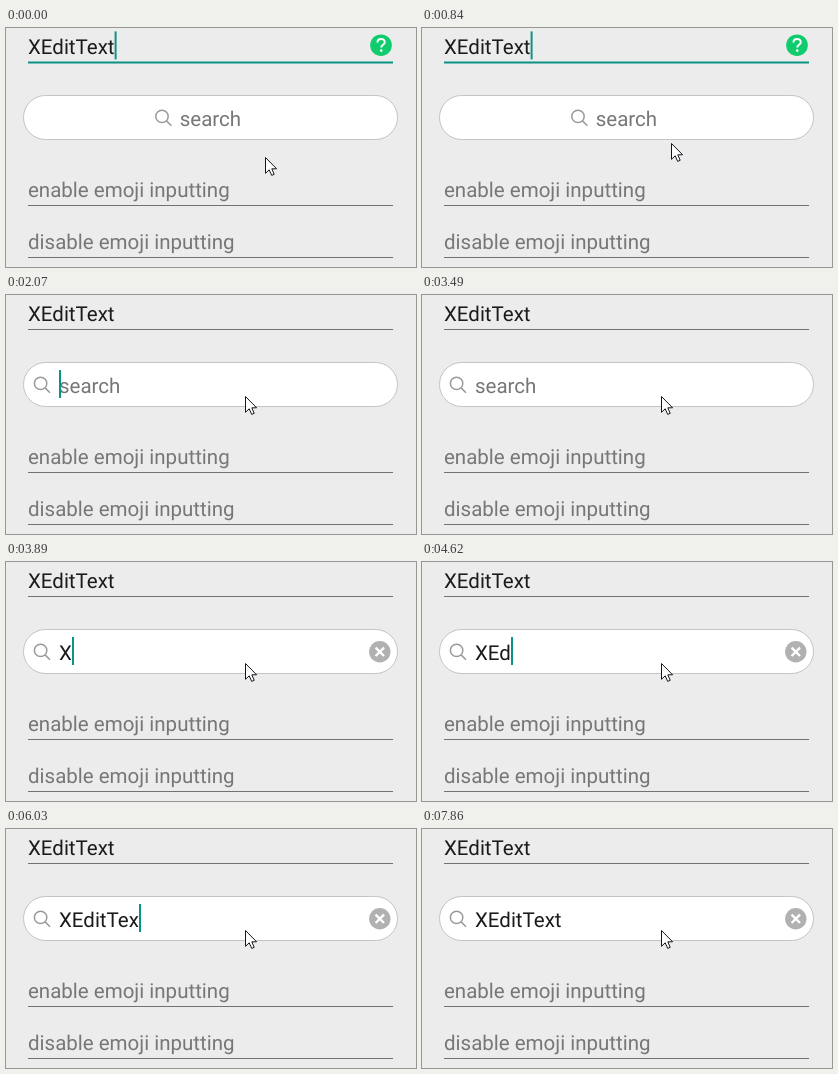
Animation of 410x239 px, one loop 8000 ms. Source, as an HTML page:

```html
<!DOCTYPE html>
<html lang="en">
<head>
<meta charset="utf-8">
<title>Edit text demo</title>
<style>
  html, body { margin: 0; width: 100%; height: 100%; overflow: hidden; background: #ececec; }
  svg { display: block; width: 410px; height: 239px; }
  text { font: 20.5px Roboto, sans-serif; fill: #1b1b1b; text-rendering: geometricPrecision; }
  .hint { fill: #777; }
  .line { fill: #717171; }
  .accent { fill: #0b9384; }
</style>
</head>
<body>
<svg viewBox="0 0 410 239">
  <rect width="410" height="239" fill="#ececec"/>

  <text x="22" y="26">XEditText</text>
  <rect id="idleLine" class="line" x="22" y="34" width="365" height="1"/>
  <g id="focused">
    <rect class="accent" x="22" y="33.5" width="365" height="2"/>
    <circle cx="375" cy="17.2" r="10.8" fill="#10cc6c"/>
    <path d="M371.4 14.6C371.4 9.8 378.8 9.8 378.8 14.2C378.8 16.8 375.2 16.8 375.2 19.6"
      fill="none" stroke="#fff" stroke-width="2"/>
    <circle cx="375.2" cy="22.6" r="1.3" fill="#fff"/>
  </g>

  <rect x="17.5" y="67.5" width="374" height="44" rx="22" fill="#fff" stroke="#c4c4c4"/>
  <g id="lens" fill="none" stroke="#999" stroke-width="1.5">
    <circle cx="34.6" cy="88.4" r="6.2"/>
    <path d="M39.1 92.9L44 97.8"/>
  </g>
  <text id="search" y="98"></text>
  <g id="clear">
    <circle cx="373.8" cy="89.8" r="10.7" fill="#b1b1b1"/>
    <path d="M369.6 85.6l8.4 8.4m0-8.4l-8.4 8.4" stroke="#fff" stroke-width="2.4"/>
  </g>

  <text class="hint" x="22" y="169">enable emoji inputting</text>
  <rect class="line" x="22" y="177" width="365" height="1"/>
  <text class="hint" x="22" y="221">disable emoji inputting</text>
  <rect class="line" x="22" y="229" width="365" height="1"/>

  <rect id="caret" class="accent" width="2" height="28"/>
  <path id="pointer" d="M.5 .5V16.3L4.2 12.8L6.7 18.4L9.2 17.3L6.8 11.8H11.6Z"
    fill="#fff" stroke="#15151f" stroke-linejoin="round"/>
</svg>
<script>
  const LOOP = 8000;
  const FOCUS = 2070;
  const WORD = "XEditText";
  const typeTimes = [3890, 4480, 4620, 4930, 5200, 5630, 5780, 6030, 6310];
  const caretStops = [53, 66, 77, 89, 94, 101, 113, 123, 133, 140];
  // Spans during which the caret is hidden
  const caretOff = [[410, 840], [1390, 1820], [2500, 3060], [3490, 3890],
    [4320, 4480], [6770, 7300], [7860, LOOP]];
  const pointerPath = [[0, 259, 129], [840, 249, 115], [960, 242, 105], [1080, 239, 101]];

  const el = id => document.getElementById(id);
  const show = (id, on) => el(id).setAttribute("visibility", on ? "visible" : "hidden");
  const move = (id, x, y) => el(id).setAttribute("transform", `translate(${x} ${y})`);

  function render(t) {
    const searching = t >= FOCUS;
    const typed = typeTimes.filter(at => t >= at).length;
    const search = el("search");

    show("focused", !searching);
    show("idleLine", searching);
    show("clear", typed > 0);
    move("lens", searching ? 0 : 121.4, 0);

    search.textContent = typed ? WORD.slice(0, typed) : "search";
    search.setAttribute("class", typed ? "" : "hint");
    search.setAttribute("x", searching ? 53 : 173.7);

    show("caret", !caretOff.some(([from, to]) => t >= from && t < to));
    if (searching) move("caret", caretStops[typed], 75);
    else move("caret", 108.6, 3.4);

    const [, x, y] = pointerPath.filter(([at]) => t >= at).pop();
    move("pointer", x, y);
  }

  const start = performance.now();
  function tick() {
    render((performance.now() - start) % LOOP);
    requestAnimationFrame(tick);
  }
  tick();
</script>
</body>
</html>
```
